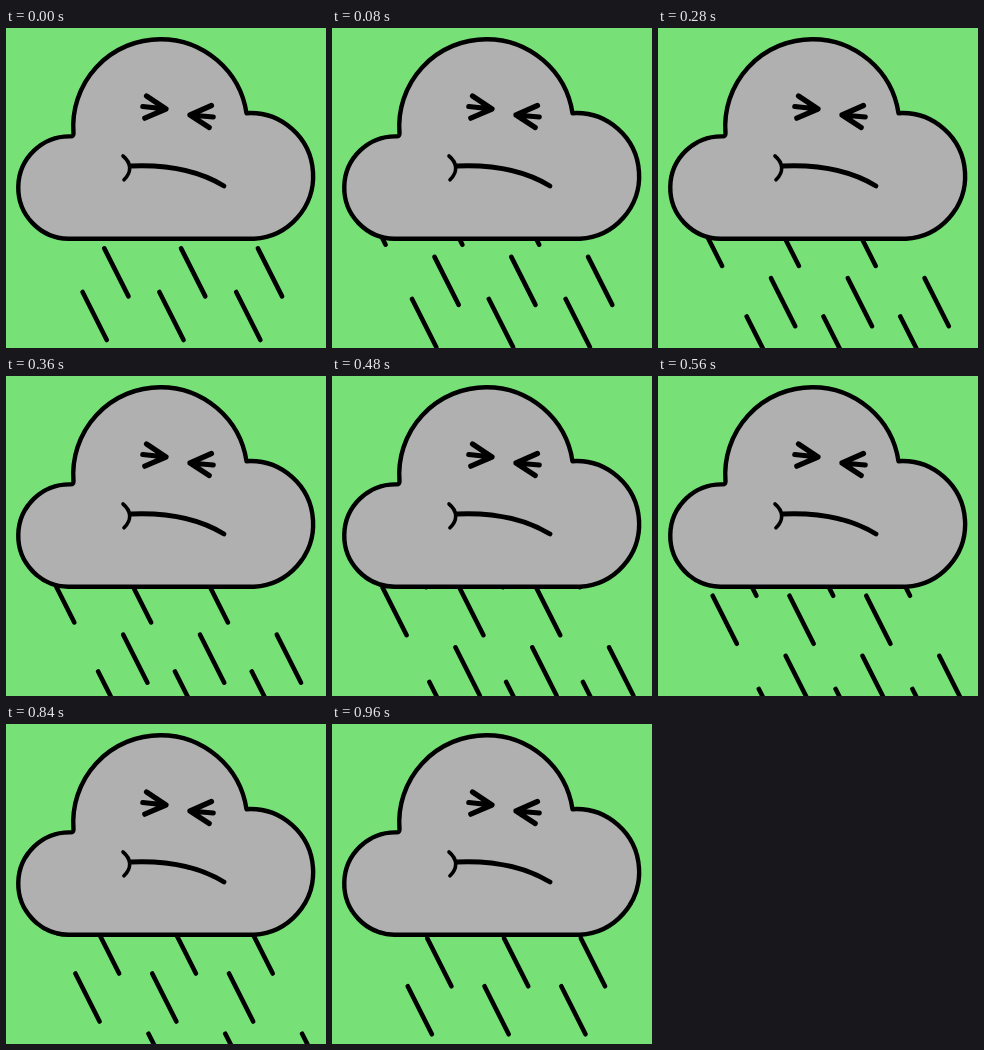
An HTML page for the animation above (1 s loop, 320 by 320 pixels).

```html
<!DOCTYPE html>
<html lang="en">
<head>
<meta charset="utf-8">
<title>Grumpy rain cloud</title>
<style>
  html, body { margin: 0; width: 100%; height: 100%; overflow: hidden; background: #77e077; }
  svg { display: block; width: 100vw; height: 100vh; }
</style>
</head>
<body>
<svg viewBox="0 0 320 320" fill="none" stroke="#000" stroke-width="4.6" stroke-linecap="round" stroke-linejoin="round">
  <rect width="320" height="320" fill="#77e077" stroke="none"/>
  <g id="rain"></g>
  <path id="cloud" fill="#b0b0b0" stroke-width="4.4"
    d="M62.5 210.8 A51.2 51.2 0 1 1 64.5 108.4 Q67.8 108.500 67.5 105
       A87 87 0 0 1 154.2 11.2 A87 87 0 0 1 240.5 85.2 A62.8 62.8 0 0 1 248 210.8 Z"/>
  <path id="eyes" stroke-width="5.2"
    d="M140.5 68 L160 81 L138.8 90.2 M136.8 78.5 L160 81 M205.5 77.5 L184 87 L203.2 99.5 M207.2 89 L184 87"/>
  <path id="mouth" stroke-width="4.8" d="M125 138 C160 136.500 192 142 218 158"/>
  <path id="cheek" stroke-width="3.6" d="M117 128 C125.500 135 126 144 118 151.800"/>
</svg>
<script>
  const LOOP = 1000, STEP = 40;
  const GAP = 76.8;             // between drops in a row
  const DX = 24.2, DY = 48;     // extent of one drop
  const SLOPE = 0.495;
  const FAST = 106.3, SLOW = 87.5;

  // x is where the row's first track crosses y = 220
  const rows = [
    { x: 98.1, y: 220.4, speed: FAST },
    { x: 54.8, y: 264, speed: SLOW },
    { x: 54.8, y: 160.2, speed: FAST },
    { x: 98.1, y: 112.2, speed: FAST }
  ];

  const rain = document.getElementById('rain');
  for (const row of rows) {
    row.el = document.createElementNS('http://www.w3.org/2000/svg', 'path');
    row.el.setAttribute('d', [0, 1, 2].map(i => `M${i * GAP} 0 l${DX} ${DY}`).join(' '));
    rain.appendChild(row.el);
  }

  function draw(ms) {
    const t = Math.floor((ms % LOOP) / STEP) * STEP / 1000;
    for (const { el, x, y, speed } of rows) {
      const top = y + speed * t;
      el.setAttribute('transform', `translate(${x + (top - 220) * SLOPE} ${top})`);
    }
  }

  const start = performance.now();
  function tick() {
    draw(performance.now() - start);
    requestAnimationFrame(tick);
  }
  draw(0);
  requestAnimationFrame(tick);
</script>
</body>
</html>
```
